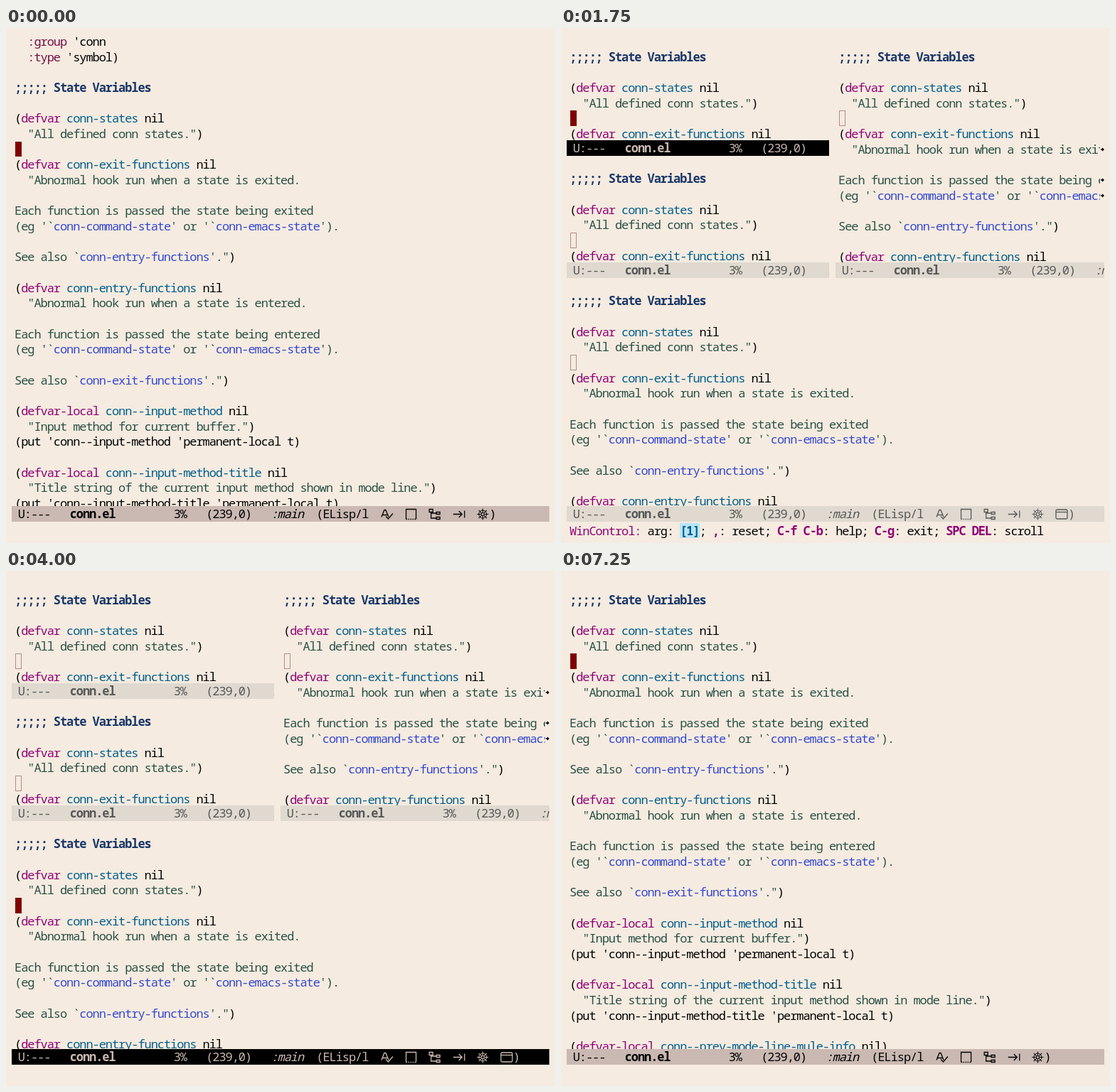
Write an HTML page that moves like this. It is 772x725 px and loops after 7.75 s.

```html
<!DOCTYPE html>
<html lang="en">
<head>
<meta charset="utf-8">
<title>Window control</title>
<style>
  html, body { margin: 0; width: 100%; height: 100%; overflow: hidden; background: #f5ebe0; }
  body {
    --cell: 9.12px; --row: 21.67px;
    position: relative; color: #000;
    font: 17px/var(--row) "Noto Sans Mono", "DejaVu Sans Mono", monospace;
    letter-spacing: calc(var(--cell) - .6em);
    font-variant-ligatures: none;
  }
  pre { margin: 0; font: inherit; position: absolute; left: -.4px; top: 0; white-space: pre; }
  b, .head { font-weight: 600; }
  .win, .text, .bar, .cursor, .bar svg, .cut, #mini { position: absolute; }
  .win, .text, .bar { overflow: hidden; }
  .text { left: 4.5px; right: 6.5px; top: 0; bottom: 22px; }
  .cut { right: 0; width: 6px; height: 22px; }
  .cursor { left: 0; width: 9.2px; height: var(--row); box-sizing: border-box; border: 1px solid #b48d87; }
  .on .cursor { background: #7f0000; border: 0; }
  .bar { left: 0; right: 0; bottom: 0; height: 22px; background: #dfd9cf; color: #585858; }
  .on .bar { background: #000; color: #cab9b2; }
  .on.idle .bar { background: #cab9b2; color: #000; }
  .bar svg { left: 0; top: 0; }
  svg { fill: none; stroke: currentColor; stroke-width: 1.3; }
  #mini { left: 12.5px; top: 696.5px; }
  .key { color: #8f0075; }
  .opt { color: #721045; }
  .name { color: #005e8b; }
  .doc { color: #2a5045; }
  .link { color: #3548cf; }
  .head { color: #193668; }
  .arg { display: inline-block; vertical-align: top; color: #005e8b; background: #b8e4f5; }
</style>
</head>
<body>
<div id="wins"></div>
<div id="mini"></div>
<script>
const ROW = 21.67, LOOP = 7750, CURSOR_ROW = 7;

const hook = (verb, other) => `(defvar conn-${verb}-functions nil
  "Abnormal hook run when a state is ${verb === 'exit' ? 'exited' : 'entered'}.

Each function is passed the state being ${verb === 'exit' ? 'exited' : 'entered'}
(eg '\`conn-command-state' or '\`conn-emacs-state').

See also \`conn-${other}-functions'.")
`;
const local = (name, doc) => `(defvar-local ${name} nil
  "${doc}")
(put '${name} 'permanent-local t)
`;
const source = [
  "  :group 'conn\n  :type 'symbol)\n",
  ';;;;; State Variables\n',
  '(defvar conn-states nil\n  "All defined conn states.")\n',
  hook('exit', 'entry'),
  hook('entry', 'exit'),
  local('conn--input-method', 'Input method for current buffer.'),
  local('conn--input-method-title', 'Title string of the current input method shown in mode line.'),
  '(defvar-local conn--prev-mode-line-mule-info nil)\n'
].join('\n');
const lines = source.split('\n');

const span = (cls, s) => `<span class="${cls}">${s}</span>`;
const code = source.replace(/^;.*$|"[^"]*"|^\(defvar\S* \S+|:\w+/gm, s => {
  if (s[0] === ';') return span('head', s);
  if (s[0] === ':') return span('opt', s);
  if (s[0] === '"') return span('doc', s.replace(/`([^']+)'/g, (_, t) => '`' + span('link', t) + "'"));
  const [key, name] = s.slice(1).split(' ');
  return '(' + span('key', key) + ' ' + span('name', name);
});

const bold = s => `<b>${s}</b>`;
const key = s => span('key', bold(s));
const prompt = `${span('key', 'WinControl:')} arg: ${span('arg', bold('[1]'))}; ${key(',')}: reset; ` +
  `${key('C-f')} ${key('C-b')}: help; ${key('C-g')}: exit; ${key('SPC')} ${key('DEL')}: scroll`;
const status = ' U:---   ' + bold('conn.el') + ' '.repeat(9) + '3%   (239,0)   <i>:main</i>  (ELisp/l';

// Each icon is centred on 0,0.
const spokes = [0, 45, 90, 135].map(a => `<path d="M-8 0H-2M2 0H8" transform="rotate(${a})"/>`).join('');
const icons = [
  '<path d="M-8 4L-4-6H-2L2 4M-6.5 1H.5M-2 3L1.5 6.5 8-1"/>',
  '<path d="M-7 7V-7H7V7"/><path d="M-7 7H8" stroke-dasharray="1.5 1.5"/>',
  '<path d="M-8-7h5v4h-5zM2-3h5v3h-5zM2 4h5v3h-5zM-5.5-3V5.5H2M-5.5-1.5H2"/>',
  '<path d="M-8 0H4M0-4.5L4.5 0 0 4.5M8-5V5"/>',
  '<g stroke-width="1"><circle r="5.5"/><circle r="2"/>' + spokes + '</g>',
  '<rect x="-8" y="-6.5" width="16" height="13" rx="1.5"/><path d="M-8-3H8"/>'
];

function bar(idle) {
  const shown = icons.slice(0, idle ? 5 : 6);
  const art = shown.map((d, i) => `<g transform="translate(${528 + 33.6 * i} 11.5)">${d}</g>`).join('');
  const end = 537 + 33.6 * (shown.length - 1);
  return `<div class="bar"><pre>${status}</pre><svg width="756" height="22">${art}</svg>` +
    `<pre style="left:${end}px">)</pre></div>`;
}

function windowHtml([x, y, w, h, first], active, idle) {
  const cols = (w - 9) / 9.12;
  const cuts = lines.slice(first).map((s, i) => s.length > cols && (i + .5) * ROW < h - 22
    ? `<svg class="cut" style="top:${i * ROW}px"><path d="M1 11H5M3 9L5 11 3 13"/></svg>` : '').join('');
  return `<div class="win ${active ? 'on' : ''} ${idle ? 'idle' : ''}" style="left:${x}px;top:${y}px;width:${w}px;height:${h}px">
    <div class="text"><pre style="top:${-first * ROW}px">${code}</pre>
    <div class="cursor" style="top:${(CURSOR_ROW - first) * ROW}px"></div></div>${cuts}${bar(idle)}</div>`;
}

// Windows: x, y, width, height, first line.
const FULL = 687, HALF = FULL / 2, QUARTER = HALF / 2;
const start = [8, 8, 756, FULL, 0];
const bottom = [8, 8 + HALF, 756, HALF, 2];
const right = [386, 8, 378, HALF, 2];
const two = [[8, 8, 756, HALF, 0], bottom];
const three = [[8, 8, 369, HALF, 0], right, bottom];
const four = [[8, 8, 369, QUARTER, 2], right, bottom, [8, 8 + QUARTER, 369, QUARTER, 2]];
const sole = [[8, 8, 756, FULL, 2]];

// Steps: start time, windows, selected window, mode.
const steps = [
  [0, [start], 0, 'idle'],
  [500, [start], 0, 'control'],
  [1000, two, 0, 'control'],
  [1250, three, 0, 'control'],
  [1750, four, 0, 'control'],
  [2500, four, 0, 'pick'],
  [3250, four, 2, 'control'],
  [4000, four, 2, 'pick'],
  [4750, four, 1, 'control'],
  [5750, sole, 0, 'control'],
  [6250, sole, 0, 'idle']
];

const wins = document.getElementById('wins'), mini = document.getElementById('mini');
let current;
function draw() {
  const t = performance.now() % LOOP;
  const step = steps.findLast(s => s[0] <= t);
  if (step !== current) {
    current = step;
    const [, list, selected, mode] = step;
    wins.innerHTML = list.map((w, i) => windowHtml(w, i === selected, mode === 'idle')).join('');
    mini.innerHTML = mode === 'control' ? `<pre>${prompt}</pre>` : '';
  }
  requestAnimationFrame(draw);
}
draw();
</script>
</body>
</html>
```
